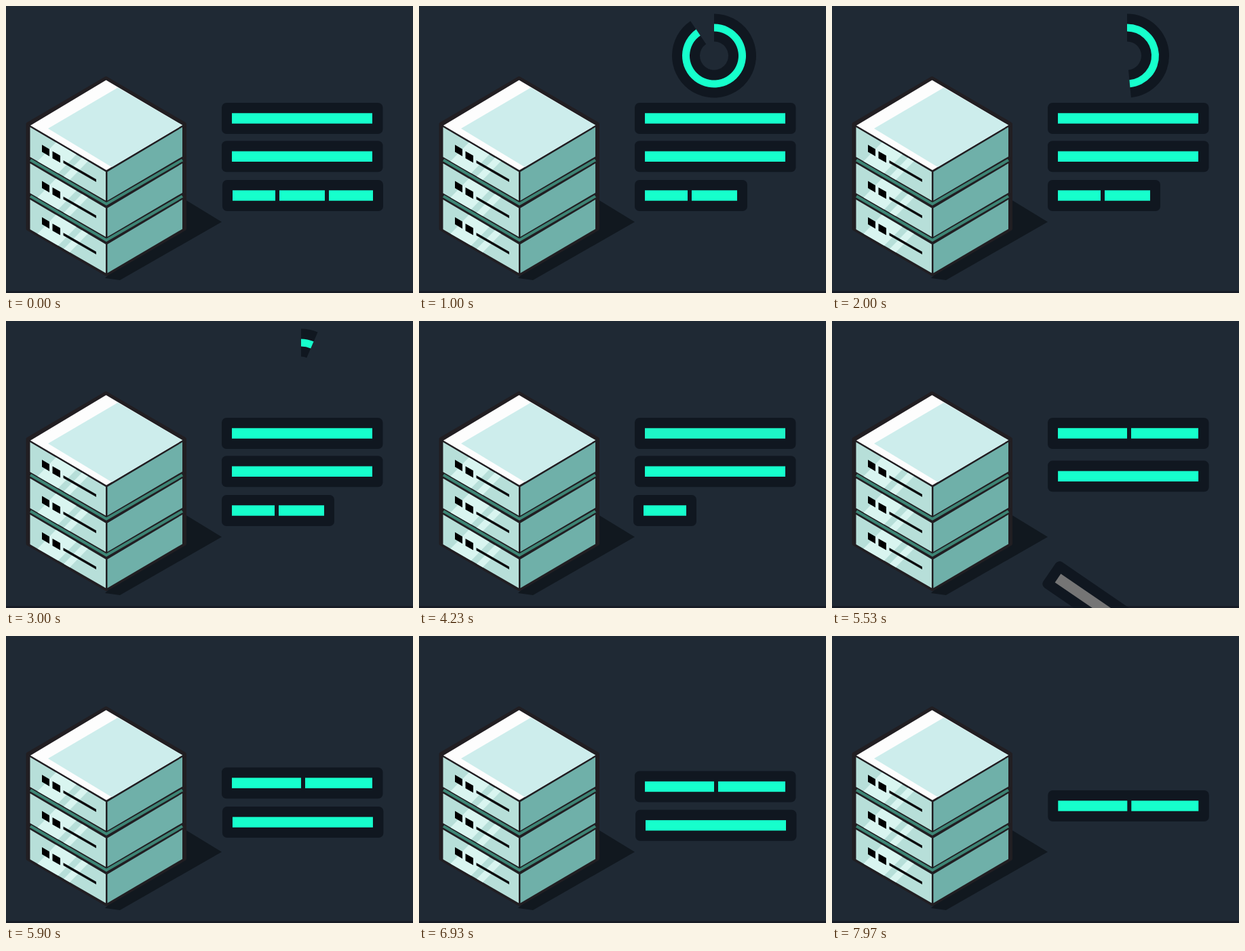
Write an HTML page that moves like this. It is 600x424 px and loops after 8000 ms.

```html
<!DOCTYPE html>
<html>
<head>
<meta charset="utf-8">
<style>
html, body { margin: 0; width: 100%; height: 100%; overflow: hidden; background: #1f2934; }
svg { display: block; width: 100%; height: 100%; }
</style>
</head>
<body>
<svg id="stage" viewBox="0 0 600 424"></svg>
<script>
const LOOP = 8000;
const GREEN = [22, 255, 204], GREY = [117, 117, 117], DARK = '#101720', INK = '#211e22';
const CX = 435, CY = 73.5;
const stage = document.getElementById('stage');

function add(parent, tag, attrs) {
  const el = document.createElementNS('http://www.w3.org/2000/svg', tag);
  set(el, attrs);
  parent.appendChild(el);
  return el;
}
function set(el, attrs) {
  for (const k in attrs) el.setAttribute(k, attrs[k]);
}
const poly = (parent, points, fill, more) => add(parent, 'polygon', { points, fill, ...more });
const rgb = c => `rgb(${c.map(Math.round)})`;
const mix = (a, b, p) => a + (b - a) * p;
const span = (t, a, b) => Math.min(1, Math.max(0, (t - a) / (b - a)));
const quad = p => p < .5 ? 2 * p * p : 1 - 2 * (1 - p) ** 2;
const cubic = p => p < .5 ? 4 * p ** 3 : 1 - 4 * (1 - p) ** 3;

function drawServer() {
  poly(stage, '264,286 318,319 168,405 146,402', '#11181f');
  poly(stage, '147.5,107 263,174.5 263,329 148,396 32.5,329 32.5,174.5', INK,
    { stroke: INK, 'stroke-width': 6, 'stroke-linejoin': 'round' });
  poly(stage, '147.5,109.5 260,176 148,242.5 36,176.5', '#fdfdfd');
  poly(stage, '165,120.5 260,176 156,238 62,181', '#cdedec');
  const clip = add(add(stage, 'defs', {}), 'clipPath', { id: 'front' });
  poly(clip, '35.5,179 147,245 147,287.5 35.5,223', '#000');
  for (let i = 0; i < 3; i++) {
    const layer = add(stage, 'g', { transform: `translate(0 ${i * 53.5})` });
    const face = add(layer, 'g', { 'clip-path': 'url(#front)' });
    add(face, 'rect', { x: 30, y: 170, width: 120, height: 125, fill: '#b7dfd9' });
    poly(face, '75,200 105,218 75,249 45,231', '#d9f5f0');
    poly(face, '113,223 122,228 92,259 83,254', '#d9f5f0');
    poly(layer, '149.5,245 260,179 260,222.5 149.5,287.5', '#6fb0a9');
    poly(layer, '53,205 64,211.5 64,222 53,215.5', '#000');
    poly(layer, '68.5,214.5 80,221 80,231.5 68.5,225', '#000');
    poly(layer, '84.5,228 133,256 133,260 84.5,232', '#0c0c0e');
    if (i < 2) add(layer, 'polyline', {
      points: '36,227.5 148,292.5 260,227.5', fill: 'none', stroke: '#3d8575', 'stroke-width': 4
    });
  }
  add(stage, 'rect', { y: 421, width: 600, height: 3, fill: '#171c26' });
}

// A row is drawn around its own vertical centre.
function makeRow(segments) {
  const g = add(stage, 'g', {});
  const box = add(g, 'rect', { x: 318, y: -23, width: 237.5, height: 46, rx: 7, fill: DARK });
  const bars = segments.map(([a, b]) =>
    add(g, 'rect', { x: a, y: -7.7, width: b - a, height: 15.4, fill: rgb(GREEN) }));
  return { g, box, bars, segments };
}
const place = (row, x, y) => set(row.g, { transform: `translate(${x} ${y})` });
const show = (row, opacity) => set(row.g, { opacity });

function resize(row, width) {
  set(row.box, { width });
  const right = 318 + width - 15;
  row.bars.forEach((bar, i) => {
    const [a, b] = row.segments[i];
    set(bar, { width: Math.max(0, Math.min(b, right) - a) });
  });
}

function sector(r0, r1, deg) {
  const at = (r, d) => {
    const a = d * Math.PI / 180;
    return `${CX + r * Math.sin(a)} ${CY - r * Math.cos(a)}`;
  };
  const end = Math.min(deg, 359.99), big = end > 180 ? 1 : 0;
  return `M${at(r1, 0)}A${r1} ${r1} 0 ${big} 1 ${at(r1, end)}` +
    `L${at(r0, end)}A${r0} ${r0} 0 ${big} 0 ${at(r0, 0)}Z`;
}

drawServer();
const lower = makeRow([[333, 540]]);
const pieces = makeRow([[333, 396], [402, 469], [475, 540]]);
const pair = makeRow([[333, 435], [441, 540]]);
const falling = makeRow([[333, 540]]);
const dial = add(stage, 'g', {});
const rim = add(dial, 'path', { fill: DARK });
const ring = add(dial, 'path', { fill: rgb(GREEN) });

function drawDial(t) {
  const deg = 360 * (1 - span(t, 775, 3155));
  const pop = quad(span(t, 400, 770));
  const s = mix(.8, 1, pop);
  set(dial, {
    opacity: deg > 0 ? pop : 0,
    transform: `translate(${CX * (1 - s)} ${CY * (1 - s)}) scale(${s})`
  });
  set(rim, { d: sector(21, 62, deg) });
  set(ring, { d: sector(36, 47, deg) });
}

function drawPieces(t) {
  const width = 237 - 71 * quad(span(t, 0, 400)) - 73 * quad(span(t, 3400, 3850)) -
    93 * quad(span(t, 4500, 5290));
  const x = 1 - span(t, 0, 400) - 2 * span(t, 3850, 4200) + 2 * span(t, 4500, 5000);
  resize(pieces, Math.max(0, width));
  place(pieces, x, 280);
}

function drawFalling(t) {
  const k = Math.max(0, (t - 4500) / 530) ** 2;
  const p = span(t, 4200, 4650);
  set(falling.g, { transform: `translate(0 ${166 + 56.5 * k}) rotate(${9.1 * k} 333 0)` });
  set(falling.bars[0], { fill: rgb(GREEN.map((c, i) => mix(c, GREY[i], p))) });
  show(falling, t < 6000 ? 1 : 0);
}

function drawKept(t) {
  const drop = cubic(span(t, 5250, 6147));
  const join = cubic(span(t, 7500, 7960));
  const lift = -8 * quad(span(t, 4950, 5250));
  place(pair, .3 * join, mix(mix(166 + lift, 222.5, drop), 251, join));
  show(pair, span(t, 4700, 5080));
  place(lower, drop * (1 - join), mix(mix(222.3, 279.8, drop), 251, join));
  show(lower, join < 1 ? 1 : 0);
}

function render(t) {
  drawDial(t);
  drawPieces(t);
  drawFalling(t);
  drawKept(t);
}

const start = performance.now();
function tick() {
  render((performance.now() - start) % LOOP);
  requestAnimationFrame(tick);
}
render(0);
requestAnimationFrame(tick);
</script>
</body>
</html>
```
